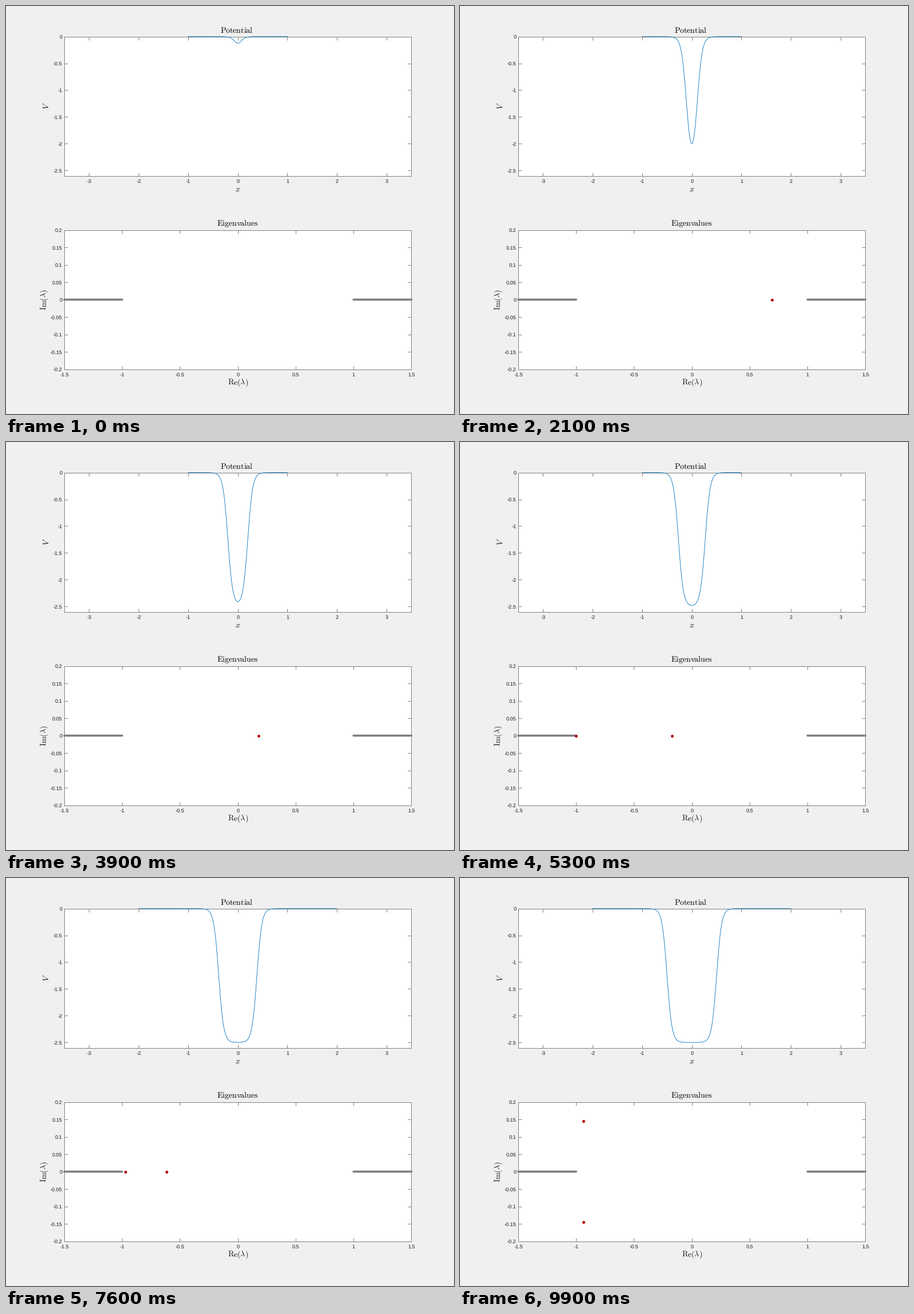
A matplotlib script for the animation above (10 s loop, 784 px wide and 715 px high).

```python
import numpy as np
import matplotlib.pyplot as plt
from matplotlib.animation import FuncAnimation
from numpy.polynomial import Chebyshev

W, H, DPI = 784, 715, 100
PX = 72 / DPI  # points per pixel
FRAMES = 100
DEPTH, STEEP = 2.5, 10
INK, EDGE = "#1c1c1c", "#808080"
LEFT, WIDE, TALL = 102, 607.4, 244

plt.rcParams.update({
    "font.family": "Liberation Sans",
    "mathtext.fontset": "cm",
    "text.hinting": "none",
})


def well(x, a):
    return -DEPTH / 2 * (np.tanh(STEEP * (x + a)) - np.tanh(STEEP * (x - a)))


def mismatch(t, a, end=1.2, steps=300):
    """Even solution at energy cos(t), compared with the decaying tail."""
    lam = np.cos(t)
    h = end / steps
    u, du = np.ones_like(lam), np.zeros_like(lam)
    for v in well((np.arange(steps) + 0.5) * h, a):
        u = u + h / 2 * du
        du = du + h * (1 - (lam - v) ** 2) * u
        u = u + h / 2 * du
    return du + np.sin(t) * u


def eigenvalues(a):
    fit = Chebyshev.interpolate(mismatch, 18, [0, 3.6], args=(a,))
    t = fit.roots().astype(complex)
    t = t[(np.abs(t.imag) < 0.8) & (t.real > 0) & (np.sin(t).real > 0)]
    lam = np.cos(t)
    return lam[lam.real < 0.9995]


widths = 0.005 * np.arange(1, FRAMES + 1)
spectra = [eigenvalues(a) for a in widths]

fig = plt.figure(figsize=(W / DPI, H / DPI), dpi=DPI, facecolor="#f0f0f0")


def label(x, y, text, size=9.2, ha="center", color=INK, rotation=0):
    fig.text(x / W, 1 - y / H, text, fontsize=size * PX, ha=ha, va="baseline",
             color=color, rotation=rotation, rotation_mode="anchor")


def panel(base, xlim, ylim, xticks, yticks):
    box = (LEFT / W, 1 - base / H, WIDE / W, TALL / H)
    ax = fig.add_axes(box, xlim=xlim, ylim=ylim, xticks=xticks, yticks=yticks)
    ax.tick_params(direction="in", length=6 * PX, width=PX, color=EDGE,
                   top=True, right=True, labelbottom=False, labelleft=False)
    for spine in ax.spines.values():
        spine.set(linewidth=PX, edgecolor=EDGE)
    for v in xticks:
        x = LEFT + WIDE * (v - xlim[0]) / (xlim[1] - xlim[0])
        label(x, base + 12.4, f"{v:g}")
    for v in yticks:
        y = base - TALL * (v - ylim[0]) / (ylim[1] - ylim[0])
        label(98.4, y + 3.4, f"{v:g}", ha="right")
    return ax


top = panel(297.6, (-3.5, 3.5), (-2.6, 0), range(-3, 4),
            [-2.5, -2, -1.5, -1, -0.5, 0])
low = panel(636.55, (-1.5, 1.5), (-0.2, 0.2), [-1.5, -1, -0.5, 0, 0.5, 1, 1.5],
            [-0.2, -0.15, -0.1, -0.05, 0, 0.05, 0.1, 0.15, 0.2])

# Negative spaces stand in for the kerning that mathtext leaves out.
MID, BIG = 405.7, 14
label(MID - 1.5, 46.8, r"$\mathrm{P}\hspace{-0.03}\mathrm{otential}$", BIG,
      color="black")
label(MID, 385.6,
      r"$\mathrm{Eigen}\hspace{-0.03}\mathrm{v}\hspace{-0.06}\mathrm{alues}$",
      BIG, color="black")
label(MID, 325, r"$x$", BIG)
label(MID, 663.6, r"$\mathrm{Re}(\lambda)$", BIG)
label(75, 175, r"$V$", BIG, rotation=90)
label(70.6, 514.5, r"$\mathrm{Im}(\lambda)$", BIG, rotation=90)

curve, = top.plot([], [], color="#0072bd", lw=0.85 * PX, zorder=5,
                  clip_on=False)
for side in (-1, 1):
    low.plot([side, 1.5 * side], [0, 0], color="#7f7f7f", lw=3.6 * PX,
             solid_capstyle="round", zorder=4, clip_on=False, snap=False)
dots, = low.plot([], [], "o", color="#b80000", ms=5 * PX, mew=0, zorder=6,
                 snap=False)


def update(i):
    a = widths[i]
    reach = 1 if a < 0.352 else 2
    x = np.linspace(-reach, reach, 801)
    curve.set_data(x, well(x, a))
    dots.set_data(spectra[i].real, spectra[i].imag)
    return curve, dots


anim = FuncAnimation(fig, update, frames=FRAMES, interval=100, repeat=True,
                     repeat_delay=0)
plt.show()
```
